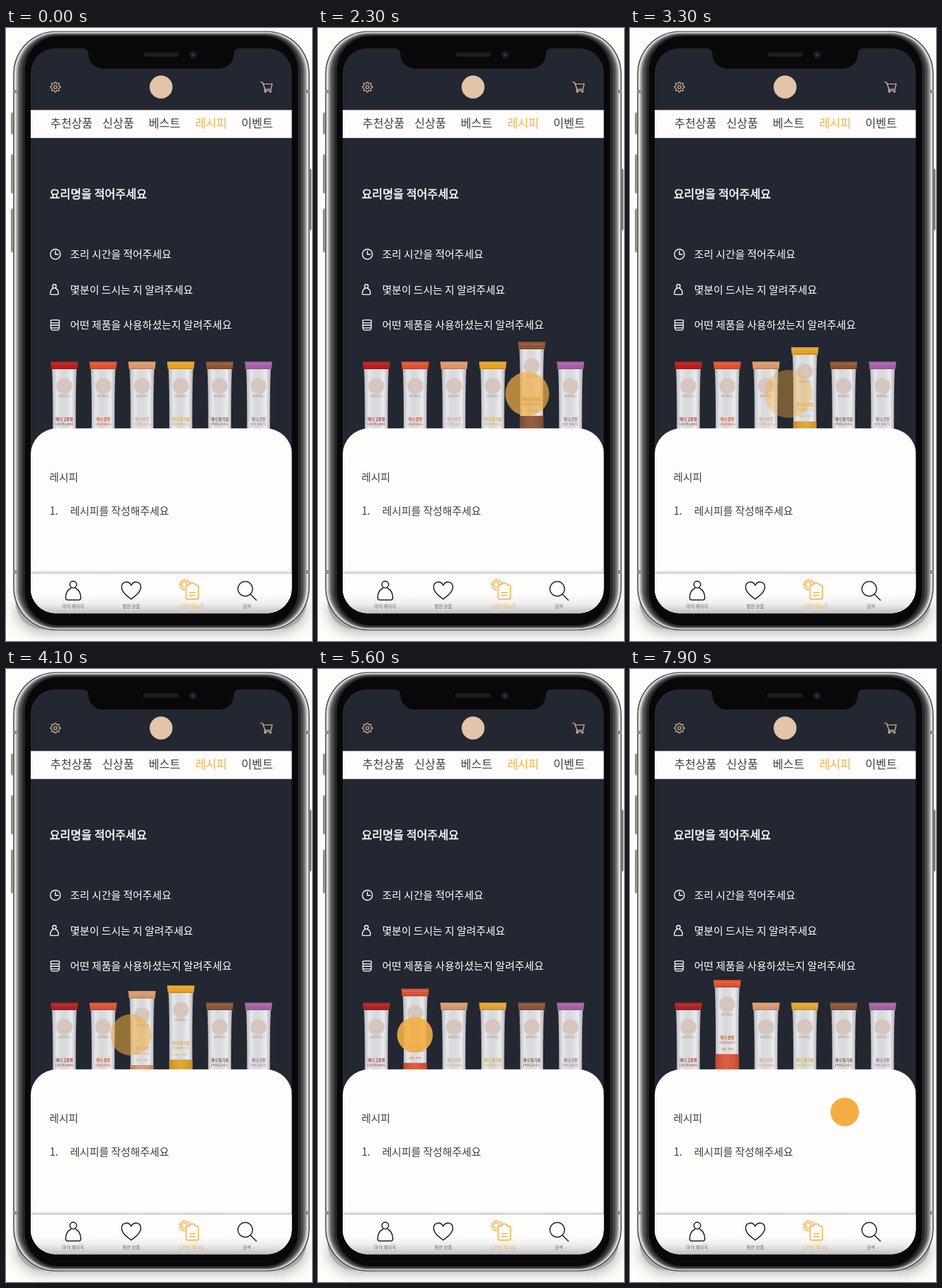
Recreate the animation shown at these times as an HTML page with a canvas. Size 446x893 px, loop 8000 ms.

```html
<!DOCTYPE html>
<html lang="ko">
<head>
<meta charset="utf-8">
<title>레시피</title>
<style>
html, body { margin: 0; width: 100%; height: 100%; overflow: hidden; background: #fefdf9; }
canvas { display: block; width: 446px; height: 893px; }
</style>
</head>
<body>
<canvas id="stage"></canvas>
<script>
const W = 446, H = 893, LOOP = 8000, STEP = 100;
const NAVY = '#232731', ORANGE = '#f3ae43', BEIGE = '#e3c4a8', INK = '#3f4046', PAPER = '#fefdfc';
const FONT = '"Noto Sans CJK KR", "Noto Sans CJK", sans-serif';
const canvas = document.getElementById('stage');
const ctx = canvas.getContext('2d');
const dpr = window.devicePixelRatio || 1;
canvas.width = W * dpr;
canvas.height = H * dpr;

const PACKS = [
  ['고추장', 'GOCHUJANG', '#b3201d', '#a8322f'],
  ['쌈장', 'SSAMJANG', '#dc5434', '#cf5638'],
  ['된장', 'DOENJANG', '#d9976f', '#d3a183'],
  ['참기름', 'SESAME OIL', '#e2a22d', '#d9a447'],
  ['들기름', 'PERILLA OIL', '#8b5537', '#84553e'],
  ['간장', 'SOY SAUCE', '#a561a5', '#9a6a9d']
];

// Lift in pixels for each pack, as [time, value] points
const LIFTS = {
  1: [[5100, 0], [5500, 16], [5900, 33]],
  2: [[3800, 0], [4100, 17], [4400, 33], [4900, 33], [5100, 25], [5500, 0]],
  3: [[3000, 0], [3300, 21], [3600, 33], [3900, 33], [4100, 25], [4500, 0]],
  4: [[1600, 0], [2000, 21], [2300, 29], [2400, 33], [2700, 33], [3200, 0]]
};

// Finger path: x position, radius and opacity
const DRAG = {
  x: [[2000, 313], [2200, 309], [2400, 301], [2900, 257], [3300, 231], [3800, 200],
      [4100, 182], [4700, 151], [4900, 147], [5400, 142], [5700, 141]],
  r: [[1200, 3], [1700, 21], [2000, 28], [2300, 32], [2700, 35], [3300, 35], [3800, 33],
      [4100, 30], [4900, 26], [6500, 26], [7000, 33]],
  a: [[2000, 1], [2300, .7], [3300, .4], [4100, .55], [4900, .9], [5600, .9], [6500, .6], [7000, 0]]
};
const PRESS = [[7400, 4], [7900, 20.8]];

function track(points, t) {
  if (t <= points[0][0]) return points[0][1];
  for (let i = 1; i < points.length; i++) {
    const [t0, v0] = points[i - 1], [t1, v1] = points[i];
    if (t <= t1) return v0 + (v1 - v0) * (t - t0) / (t1 - t0);
  }
  return points[points.length - 1][1];
}

function box(x, y, w, h, r, fill) {
  ctx.beginPath();
  ctx.roundRect(x, y, w, h, r);
  ctx.fillStyle = fill;
  ctx.fill();
}

function disc(x, y, r, fill) {
  ctx.beginPath();
  ctx.arc(x, y, r, 0, 7);
  ctx.fillStyle = fill;
  ctx.fill();
}

function line(path, color, width) {
  ctx.strokeStyle = color;
  ctx.lineWidth = width;
  ctx.stroke(new Path2D(path));
}

function ring(x, y, r, color, width) {
  ctx.beginPath();
  ctx.arc(x, y, r, 0, 7);
  ctx.strokeStyle = color;
  ctx.lineWidth = width;
  ctx.stroke();
}

function text(str, x, y, size, color, weight = 400, align = 'left') {
  ctx.font = `${weight} ${size}px ${FONT}`;
  ctx.textAlign = align;
  ctx.fillStyle = color;
  ctx.fillText(str, x, y);
}

function fade(x0, y0, x1, y1, ...colors) {
  const g = ctx.createLinearGradient(x0, y0, x1, y1);
  colors.forEach((c, i) => g.addColorStop(i / (colors.length - 1), c));
  return g;
}

function phone() {
  ctx.save();
  ctx.shadowColor = 'rgba(90,85,85,.5)';
  ctx.shadowBlur = 20 * dpr;
  ctx.shadowOffsetY = 3 * dpr;
  box(14, 836, 424, 40, [0, 0, 44, 44], '#aaa');
  ctx.restore();

  const side = fade(7, 0, 13, 0, '#333', '#c5c5c5', '#444');
  box(7.5, 123, 5, 32, 2, side);
  box(7.5, 184, 5, 57, 2, side);
  box(7.5, 263, 5, 64, 2, side);
  box(440, 205, 5, 90, 2, fade(440, 0, 445, 0, '#444', '#c5c5c5', '#333'));

  // Metal rim: [side inset, top and bottom inset, colour]
  const rim = [
    [0, 0, '#4a4b4d'], [1.5, 1.3, '#d9dadb'], [4.5, 2.6, '#a3a4a6'], [6.5, 3.4, '#747577'],
    [9, 4.4, '#48494b'], [13, 5.6, '#27282a'], [17, 7.5, '#08080a']
  ];
  for (const [dx, dy, color] of rim) {
    box(10.5 + dx, 4.5 + dy, 432 - 2 * dx, 873 - 2 * dy, 62 - dx * .75, color);
  }
  for (const y of [90, 790]) {
    box(10.5, y, 6, 5, 0, '#8c8d8f');
    box(436.5, y, 6, 5, 0, '#8c8d8f');
  }
}

function gear(x, y) {
  ctx.beginPath();
  for (let i = 0; i < 32; i++) {
    const a = (i - .5) / 32 * Math.PI * 2;
    const r = i % 4 < 2 ? 7.3 : 5.5;
    ctx.lineTo(x + r * Math.cos(a), y + r * Math.sin(a));
  }
  ctx.closePath();
  ctx.strokeStyle = BEIGE;
  ctx.lineWidth = 1.1;
  ctx.stroke();
  ring(x, y, 2.3, BEIGE, 1.1);
}

function person(x, y, scale, color, width) {
  ctx.save();
  ctx.translate(x, y);
  ctx.scale(scale, scale);
  ring(0, 0, 4.9, color, width / scale);
  line('M-3.3 5.2C-8 7.500-11 13-11 19.500q0 3 3 3H8q3 0 3-3C11 13 8 7.500 3.300 5.200', color, width / scale);
  ctx.restore();
}

function header() {
  gear(72, 86);
  disc(226, 86, 16.7, BEIGE);
  line('M371 79h3l3.5 10.3h8.5l2-7.8h-13M377.5 89.3l-1 2.2h10', BEIGE, 1.2);
  ring(378, 93, 1.1, BEIGE, 1);
  ring(385.5, 93, 1.1, BEIGE, 1);

  box(36, 119.5, 381, 40.7, 0, PAPER);
  const tabs = [['추천상품', 95.5], ['신상품', 163.5], ['베스트', 231], ['레시피', 299], ['이벤트', 366]];
  for (const [label, x] of tabs) {
    text(label, x, 145.2, 16.7, label === '레시피' ? ORANGE : INK, 400, 'center');
  }
}

function details() {
  const title = '요리명을 적어주세요';
  text(title, 63.5, 248.3, 16.7, '#fff');
  ctx.strokeStyle = '#fff';
  ctx.lineWidth = .5;
  ctx.strokeText(title, 63.5, 248.3);

  text('조리 시간을 적어주세요', 93.5, 335, 15.3, '#fff');
  text('몇분이 드시는 지 알려주세요', 93.5, 386.8, 15.3, '#fff');
  text('어떤 제품을 사용하셨는지 알려주세요', 93.5, 438.2, 15.3, '#fff');
  ring(72, 329.5, 7.3, '#fff', 1.4);
  line('M72 325v4.8h4.3', '#fff', 1.4);
  person(70.5, 376.2, .54, '#fff', 1.4);
  line('M67 425.3h9q2 0 2 2.200t-2 2.200h-9q-2 0-2-2.200t2-2.200zM66.500 429.700q-1.500 1-1.300 4c0 4 .500 6.500 3 6.500h6.600c2.500 0 3-2.500 3-6.500q.200-3-1.300-4M65.300 433h12.400M65.500 436.800h12', '#fff', 1.3);
}

function pack(i, lift) {
  const [name, latin, color, ink] = PACKS[i];
  const x = 65 + i * 56.6, y = 486 - lift, mid = x + 20;
  ctx.beginPath();
  ctx.moveTo(x + 2, y + 10);
  ctx.lineTo(x + 38, y + 10);
  ctx.quadraticCurveTo(x + 36, y + 45, x + 37, y + 150);
  ctx.lineTo(x + 3, y + 150);
  ctx.quadraticCurveTo(x + 4, y + 45, x + 2, y + 10);
  ctx.fillStyle = fade(x + 2, 0, x + 38, 0, '#b4b7bc', '#e6e7e9', '#d6d8db', '#dadcdf', '#ececee', '#adb0b6');
  ctx.fill();

  const band = y + 108;
  box(x + 3, band, 34, 45, 0, color);
  box(x + 3, band, 34, 45, 0, fade(x + 3, 0, x + 37, 0, 'rgba(0,0,0,.15)', 'rgba(255,255,255,.06)', 'rgba(0,0,0,.12)'));

  ctx.beginPath();
  ctx.moveTo(x, y);
  ctx.lineTo(x + 40, y);
  ctx.lineTo(x + 39, y + 11);
  ctx.lineTo(x + 1, y + 11);
  ctx.fillStyle = color;
  ctx.fill();
  box(x + 1, y + 3.3, 38, .8, 0, 'rgba(255,255,255,.25)');
  box(x + 1.5, y + 9, 37, 2, 0, 'rgba(0,0,0,.12)');

  disc(mid, y + 35.5, 11.5, '#d6c6be');
  text('NUOVELI', mid, y + 51.5, 4.2, '#8d8b8d', 400, 'center');
  text('해늬 ' + name, mid, y + 86, 5.4, ink, 700, 'center');
  text(latin, mid, y + 92.5, 4.4, ink, 400, 'center');
  text('10g / 10ea', mid, y + 102, 3.8, ink, 400, 'center');
}

function sheet() {
  box(36, 583.3, 381, 290, [38, 38, 0, 0], PAPER);
  text('레시피', 63.3, 659.6, 15.2, INK);
  text('1.', 63.5, 709.2, 15.3, INK);
  text('레시피를 작성해주세요', 93.5, 709.2, 15.3, INK);
}

function tabBar() {
  box(36, 790, 381, 5, 0, fade(0, 790, 0, 795, 'rgba(120,120,125,0)', 'rgba(120,120,125,.4)'));
  box(36, 795, 381, 60, 0, PAPER);
  box(36, 826, 381, 27, 0, fade(0, 826, 0, 853, 'rgba(90,90,95,0)', 'rgba(90,90,95,.1)', 'rgba(90,90,95,.38)'));

  person(98, 810.8, 1, NAVY, 1.6);
  line('M182.5 832C176 827 168.5 821.5 168.5 814.5c0-8.5 10.5-10 14-2.5 3.5-7.5 14-6 14 2.5 0 7-7.5 12.5-14 17.5z', NAVY, 1.6);
  line('M260.5 818.5a7.3 7.3 0 1 1 7.3-8.5M260.5 815a4 4 0 1 1 3.7-4.5', ORANGE, 1.5);
  line('M262.500 813.500q0-2 2-2h2.500l2-3h5l2 3h2.500q2 0 2 2v16.500q0 2-2 2h-14q-2 0-2-2zM267.500 822.500h8M267.500 826.500h8', ORANGE, 1.5);
  ring(348.7, 817, 10.7, NAVY, 1.5);
  line('M356.3 825l8.5 8.5', NAVY, 1.6);

  const labels = [['마이 페이지', 98], ['찜한 상품', 182.5], ['나만의 레시피', 270], ['검색', 351]];
  for (const [label, x] of labels) {
    text(label, x, 844.6, 6.6, x === 270 ? ORANGE : '#6b6b70', 400, 'center');
  }
}

function notch() {
  ctx.beginPath();
  ctx.moveTo(112, 28);
  ctx.lineTo(112, 30);
  ctx.quadraticCurveTo(120, 30, 120, 38);
  ctx.arcTo(120, 59, 142, 59, 21);
  ctx.lineTo(311, 59);
  ctx.arcTo(332, 59, 332, 38, 21);
  ctx.quadraticCurveTo(332, 30, 340, 30);
  ctx.lineTo(340, 28);
  ctx.fillStyle = '#08080a';
  ctx.fill();
  box(200, 35.5, 52, 6.5, 3, '#1b1c20');
  disc(272.5, 39, 5.8, '#17191f');
  disc(272.5, 39, 2.8, '#2b3040');
}

function touch(t) {
  const press = t >= 7400;
  if (!press && (t < 1200 || t >= 7000)) return;
  ctx.globalAlpha = press ? 1 : track(DRAG.a, t);
  if (press) disc(313, 645.3, track(PRESS, t), ORANGE);
  else disc(track(DRAG.x, t), 533, track(DRAG.r, t), ORANGE);
  ctx.globalAlpha = 1;
}

function draw(t) {
  ctx.setTransform(dpr, 0, 0, dpr, 0, 0);
  ctx.lineCap = ctx.lineJoin = 'round';
  box(0, 0, W, H, 0, '#fefdf9');
  phone();
  ctx.save();
  ctx.beginPath();
  ctx.roundRect(36, 29.5, 380.5, 823, 36);
  ctx.clip();
  box(36, 29, 381, 824, 0, NAVY);
  header();
  details();
  PACKS.forEach((_, i) => pack(i, LIFTS[i] ? track(LIFTS[i], t) : 0));
  sheet();
  tabBar();
  touch(t);
  ctx.restore();
  notch();
}

function tick(now) {
  draw(Math.floor(now % LOOP / STEP) * STEP);
  requestAnimationFrame(tick);
}
requestAnimationFrame(tick);
</script>
</body>
</html>
```
